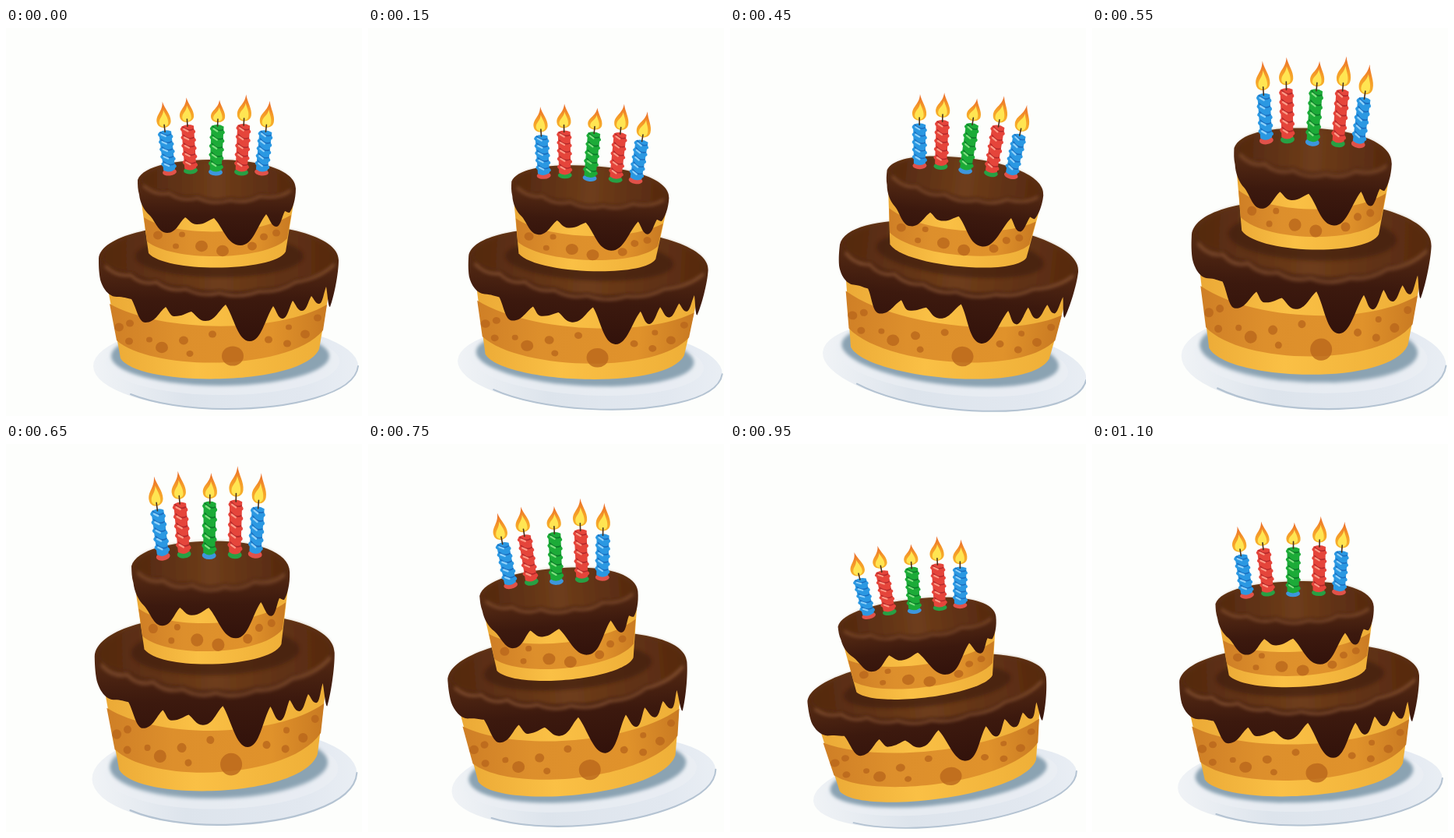
An HTML page that plays this animation: 457 px wide and 498 px high, repeating every 1150 ms.

```html
<!DOCTYPE html>
<html lang="en">
<head>
<meta charset="utf-8">
<title>Dancing cake</title>
<style>
  html, body { margin: 0; width: 100%; height: 100%; overflow: hidden; background: #fdfefc; }
  svg { display: block; width: 457px; height: 498px; }
</style>
</head>
<body>
<svg viewBox="0 0 457 498">
  <defs>
    <filter id="soft" x="-20%" y="-30%" width="140%" height="160%"><feGaussianBlur stdDeviation="2.2"/></filter>
    <linearGradient id="sponge">
      <stop offset="0" stop-color="#cf7f26"/><stop offset=".3" stop-color="#dd8f2c"/>
      <stop offset=".75" stop-color="#e0922b"/><stop offset="1" stop-color="#c97a22"/>
    </linearGradient>
    <linearGradient id="cream">
      <stop offset="0" stop-color="#eba936"/><stop offset=".4" stop-color="#fac045"/><stop offset="1" stop-color="#eeae37"/>
    </linearGradient>
    <linearGradient id="choc" x2="0" y2="1">
      <stop offset="0" stop-color="#663717"/><stop offset=".4" stop-color="#4f2612"/>
      <stop offset=".65" stop-color="#3c190e"/><stop offset="1" stop-color="#32120b"/>
    </linearGradient>
    <linearGradient id="top">
      <stop offset="0" stop-color="#53280f"/><stop offset=".5" stop-color="#6e3d1b"/><stop offset="1" stop-color="#56290f"/>
    </linearGradient>
    <linearGradient id="plate">
      <stop offset="0" stop-color="#f0f3f6"/><stop offset=".35" stop-color="#dde4ec"/>
      <stop offset=".8" stop-color="#e2e8f0"/><stop offset="1" stop-color="#e9eef4"/>
    </linearGradient>
    <linearGradient id="fire" x2="0" y2="1">
      <stop offset="0" stop-color="#e9682a"/><stop offset=".5" stop-color="#f59a28"/><stop offset="1" stop-color="#f7b52c"/>
    </linearGradient>
  </defs>
  <g id="cake"></g>
</svg>
<script>
const cake = document.getElementById('cake');
let art = '';
const path = (d, fill, more = '') => art += `<path d="${d}" fill="${fill}" ${more}/>`;
const oval = (x, y, rx, ry, fill, more = '') =>
  art += `<ellipse cx="${x}" cy="${y}" rx="${rx}" ry="${ry}" fill="${fill}" ${more}/>`;
const line = (d, color, width, more = '') =>
  path(d, 'none', `stroke="${color}" stroke-width="${width}" stroke-linecap="round" ${more}`);
const dots = list => list.forEach(([x, y, r]) => oval(x, y, r, r * .9, '#b9661b', 'opacity=".8"'));

// Round drip tips alternating with pointed gaps, starting from a tip.
function drips(points) {
  let d = '';
  for (let i = 1; i < points.length; i++) {
    const [x, y] = points[i - 1], [u, v] = points[i], w = u - x, h = v - y;
    d += i % 2
      ? `C${x + w * .5} ${y} ${u - w * .35} ${v - h * .35} ${u} ${v}`
      : `C${x + w * .35} ${y + h * .35} ${u - w * .5} ${v} ${u} ${v}`;
  }
  return d;
}

function candle(x, y, tilt, h, flame, color, light, dark, ring) {
  art += `<g transform="translate(${x} ${y}) rotate(${tilt})">`;
  oval(0, 0, 9, 4.5, ring);
  path(`M-8 ${-h}Q0 ${-h - 4} 8 ${-h}L7.5 -3Q0 2 -7.5 -3Z`, color);
  for (let k = 0; k < 5; k++) {
    const b = -7 - k * (h - 10) / 4.4;
    line(`M-7 ${b - 4}Q0 ${b + 3} 7 ${b}`, color, 5);
    line(`M-6 ${b - 7}Q0 ${b} 7 ${b - 3}`, dark, 1.6);
    line(`M-5 ${b - 4}L0 ${b - 1}`, light, 2.2);
  }
  art += `<g transform="translate(0 ${-h})">`;
  path(`M1 ${-flame}C3 ${-flame * .75} 10 ${-flame * .55} 9 ${-flame * .33}C8 -3 -8 -3 -9 ${-flame * .33}C-10 ${-flame * .6} 0 ${-flame * .65} 1 ${-flame}Z`, 'url(#fire)');
  path(`M1 ${-flame * .72}C3 ${-flame * .55} 6 ${-flame * .45} 5.5 ${-flame * .3}C5 -5 -5 -5 -6 ${-flame * .3}C-6 ${-flame * .48} 0 ${-flame * .5} 1 ${-flame * .72}Z`, '#ffe552');
  line('M0 0V-9', '#49301c', 1.6);
  art += '</g></g>';
}

// Plate
oval(282, 434, 170, 55, 'url(#plate)');
line('M452 434C448 470 365 489 282 489C235 489 190 482 160 470', '#b4c3d2', 2);
oval(278, 428, 150, 43, '#edf1f6', 'opacity=".6"');
oval(275, 421, 140, 38, '#8ba3b2', 'filter="url(#soft)"');

// Lower tier
path('M130 330L147 424C170 461 380 461 402 412L417 325Z', 'url(#cream)');
path('M133 354L142 401C190 442 365 440 407 388L412 355C350 392 200 392 133 354Z', 'url(#sponge)');
dots([[145, 384, 6], [159, 379, 5], [158, 402, 5], [184, 400, 4], [200, 410, 8], [228, 401, 6], [236, 418, 4.5],
  [265, 393, 5], [291, 421, 14], [337, 400, 5], [361, 405, 5], [384, 393, 6], [400, 372, 5], [363, 384, 4]]);
path('M121 323C119 312 119 304 119 296C122 266 195 252 273 250C350 250 427 266 427 298C427 315 421 345 416 358'
  + drips([[416, 358], [411, 332], [402, 354], [392, 344], [380, 363], [368, 350], [355, 373], [343, 357],
    [313, 402], [282, 355], [256, 376], [238, 364], [216, 370], [205, 358], [179, 378], [161, 348], [142, 345]])
  + 'C132 345 124 334 121 323Z', 'url(#choc)');
path('M123 294C130 268 195 254 273 252C350 252 420 268 424 295C418 314 395 320 372 322Q350 336 325 334Q298 342 274 336Q252 340 232 331Q210 333 194 322Q178 324 163 313C140 313 126 304 123 294Z',
  'url(#top)', 'filter="url(#soft)"');
line('M128 306Q142 320 160 317Q174 331 193 326Q209 339 231 335Q252 346 274 340Q298 348 325 338Q350 340 372 326Q402 322 421 304',
  '#8b5735', 3, 'filter="url(#soft)"');
oval(274, 293, 108, 27, '#3c1a0b', 'opacity=".6" filter="url(#soft)"');

// Upper tier
path('M174 225L183 289C205 315 345 313 359 287L369 225Z', 'url(#cream)');
path('M177 243L181 274C215 301 335 299 361 270L366 240C320 268 215 268 177 243Z', 'url(#sponge)');
dots([[195, 266, 6], [218, 280, 4], [226, 265, 4], [251, 280, 8], [278, 286, 8], [316, 280, 6], [331, 268, 5], [347, 263, 5]]);
path('M171 214C169 207 169 202 169 195C176 176 220 169 270 169C325 169 372 182 372 206C372 220 368 232 364 237'
  + drips([[364, 237], [358, 235], [347, 255], [334, 239], [301, 279], [267, 244], [245, 252], [230, 243], [207, 263], [184, 240]])
  + 'C177 234 172 224 171 214Z', 'url(#choc)');
path('M173 195C180 178 220 171 270 171C325 171 366 184 368 203C360 216 340 214 326 212Q308 222 288 217Q266 223 246 214Q226 218 209 208C190 210 176 204 173 195Z',
  'url(#top)', 'filter="url(#soft)"');
line('M177 203Q193 216 209 212Q226 224 246 218Q266 228 288 221Q308 226 326 216Q350 220 365 209', '#8b5735', 2.6, 'filter="url(#soft)"');

// Candles
const blue = ['#2b98e2', '#8fd2fa', '#1b6fc0', '#e0524a'];
const red = ['#e5453b', '#ff9a85', '#b52a2c', '#27a044'];
const green = ['#1cab38', '#7fe07f', '#0d7a2a', '#3d96dc'];
candle(210, 185, -6.5, 52, 39, ...blue);
candle(237, 183, -4, 57, 37, ...red);
candle(269, 185, 2.5, 59, 34, ...green);
candle(302, 185, 3, 60, 40, ...red);
candle(328, 185, 6, 52, 40, ...blue);
cake.innerHTML = art;

// Pose keys: step, lean in degrees, vertical stretch
const keys = [[0, 0, 1], [3, 3, .974], [7, 10, .89], [11, 2.3, 1.124], [12, .4, 1.19],
  [15, -4.9, 1.037], [17, -9.2, .9], [19, -6.6, .918], [22, -2.1, .98], [23, 0, 1]];

function draw(now) {
  const step = Math.floor(now % 1150 / 50);
  const i = keys.findIndex(k => k[0] > step);
  const a = keys[i - 1], b = keys[i], f = (step - a[0]) / (b[0] - a[0]);
  const [lean, stretch] = [1, 2].map(n => a[n] + (b[n] - a[n]) * f);
  cake.setAttribute('transform', `translate(285 491) rotate(${lean}) scale(1 ${stretch}) translate(-285 -491)`);
}

const start = performance.now();
function tick() {
  draw(performance.now() - start);
  requestAnimationFrame(tick);
}
tick();
</script>
</body>
</html>
```
